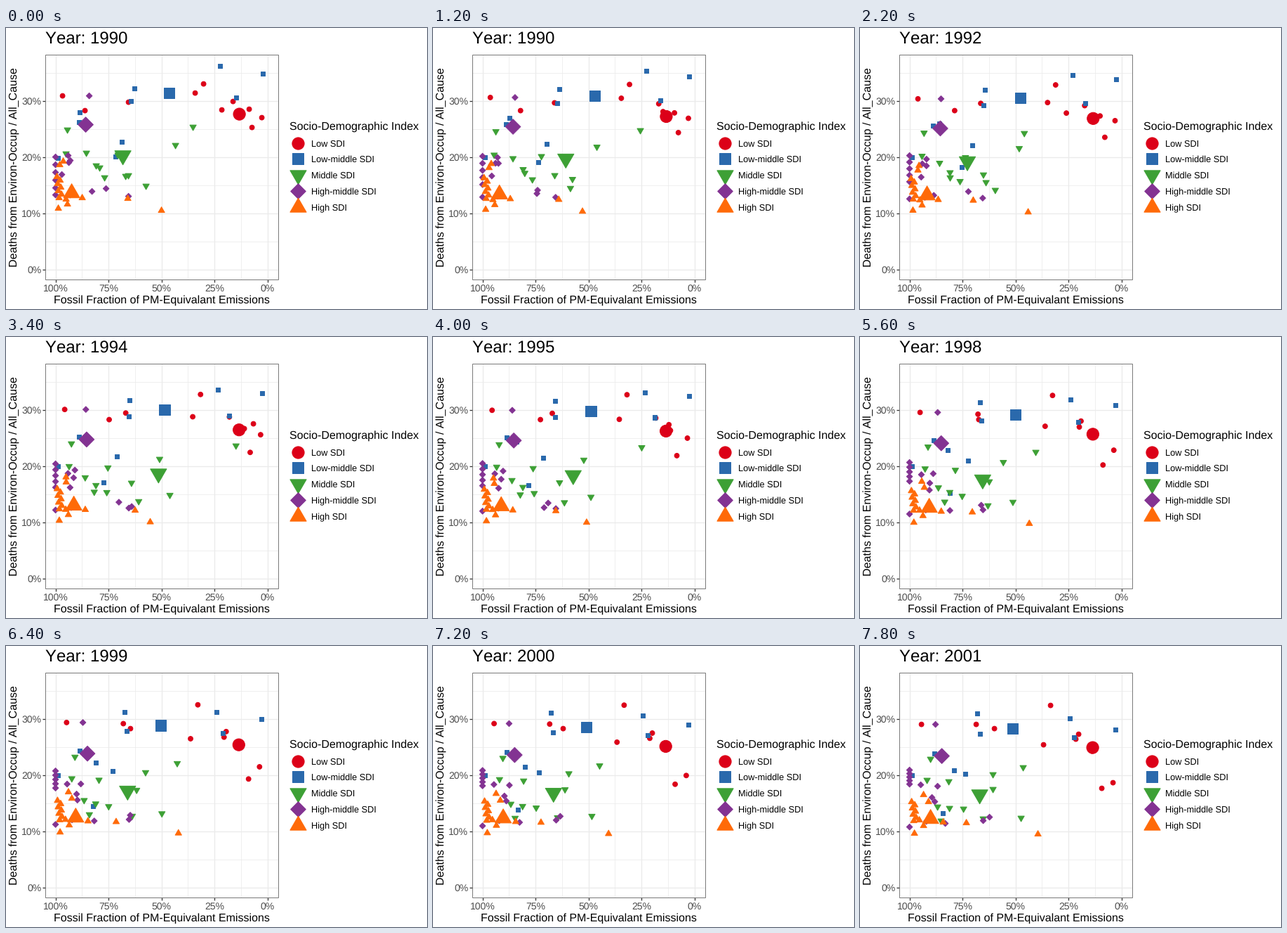
These frames come from a looping animation (600x400 px, 8 s). A matplotlib script:

```python
import numpy as np
import matplotlib.pyplot as plt
from matplotlib.animation import FuncAnimation
from matplotlib.patches import Rectangle
from matplotlib.path import Path

W, H, DPI = 600, 400, 100
FRAMES, STEP_MS = 40, 200
PT = 72 / DPI                      # points per pixel
SMALL, LARGE, EDGE = 3.4, 8.6, 1.0
LEFT, RIGHT, TOP, BOTTOM = 55.5, 387.5, 37.5, 357.5

plt.rcParams.update({
    "font.family": "Liberation Sans",
    "text.hinting": "none",
    "text.kerning_factor": 6,
})


def mark(x0, y0, x1, y1, surge=0, bend=0):
    """Start and end of a drift, a sideways surge and a vertical bow."""
    return x0, y0, x1, y1, surge, bend


# The last mark of each group is its large average
LOW = [
    mark(81, 97, 88, 112), mark(113, 118, 192, 118), mark(175, 106, 166, 112),
    mark(270, 93, 262, 141), mark(282, 80, 272, 85), mark(324, 105, 312, 126),
    mark(308, 117, 308, 133, surge=45), mark(347, 116, 331, 150),
    mark(365, 128, 361, 195, bend=-18), mark(351, 142, 345, 203, bend=-4),
    mark(333, 123, 332, 145),
]
LOW_MIDDLE = [
    mark(305, 54, 299, 103), mark(366, 65, 364, 119, bend=-8),
    mark(328, 99, 305, 130), mark(183, 86, 167, 96), mark(178, 104, 171, 125),
    mark(105, 120, 134, 177), mark(104, 134, 106, 153),
    mark(165, 162, 150, 182), mark(156, 183, 118, 238),
    mark(74, 185, 74, 184), mark(233, 93, 218, 118),
]
MIDDLE = [
    mark(267, 142, 233, 174, surge=76), mark(242, 168, 190, 184),
    mark(88, 146, 101, 162), mark(86, 180, 96, 192), mark(115, 179, 111, 230),
    mark(129, 197, 128, 232), mark(134, 200, 116, 250),
    mark(141, 214, 148, 233), mark(171, 212, 190, 205),
    mark(175, 211, 230, 246, surge=35), mark(200, 226, 176, 247),
    mark(160, 182, 127, 194), mark(167, 184, 171, 214, surge=49),
]
# Column of marks on the 100% line
HIGH_MIDDLE = [mark(71, 184 + 11 * k, 71, 177 + 5 * k) for k in range(5)] + [
    mark(71, 238, 71, 258), mark(119, 97, 108, 112), mark(89, 182, 111, 200),
    mark(92, 189, 103, 216), mark(90, 192, 87, 198), mark(80, 209, 107, 222),
    mark(143, 229, 185, 244), mark(123, 233, 122, 253, surge=57),
    mark(175, 240, 176, 249), mark(92, 238, 95, 250), mark(114, 138, 117, 157),
]
# Zigzag stack near the left edge
STACK_X = [73 + 4 * (k % 2) + k / 2 for k in range(7)]
HIGH = [mark(x, 211 + 5 * k, x + 1, 221 + 4.5 * k)
        for k, x in enumerate(STACK_X)] + [
    mark(222, 259, 254, 267, surge=-30), mark(174, 242, 152, 251, surge=20),
    mark(109, 241, 119, 250), mark(88, 250, 91, 255), mark(75, 256, 78, 266),
    mark(82, 189, 91, 211), mark(77, 194, 98, 221), mark(86, 243, 85, 247),
    mark(94, 232, 101, 243),
]


def triangle(sign):
    pts = [(0, 1.551 * sign), (-1.347, -0.776 * sign), (1.347, -0.776 * sign)]
    return Path(pts + pts[:1], closed=True)


# label, colour, marker, marker size per unit radius, vertical nudge, marks, legend y
GROUPS = [
    ("Low SDI", "#DC0018", "o", 2.0, 0, LOW, 163.7),
    ("Low-middle SDI", "#2A69AC", "s", 1.772, 0, LOW_MIDDLE, 186.3),
    ("Middle SDI", "#3DA035", triangle(-1), 3.102, -0.25, MIDDLE, 209.2),
    ("High-middle SDI", "#833392", "D", 1.772, 0, HIGH_MIDDLE, 232),
    ("High SDI", "#FF6A08", triangle(1), 3.102, 0.4, HIGH, 254.8),
]


def surge(t):
    return np.interp(t, [0, 6, 11, 17, 24, 39], [0, 0.45, -0.3, 1, 0.15, 0])


def places(marks, radii, nudge, t):
    x0, y0, x1, y1, push, bend = np.array(marks, float).T
    u = t / (FRAMES - 1)
    x = x0 + (x1 - x0) * u + push * surge(t)
    y = y0 + (y1 - y0) * u + bend * 4 * u * (1 - u)
    return np.column_stack([x - 0.4, y - 0.4 + nudge * radii])


def year(t):
    return 1990 + max(0, (t - 4) // 3)


fig = plt.figure(figsize=(W / DPI, H / DPI), dpi=DPI, facecolor="white")
ax = fig.add_axes([0, 0, 1, 1])
ax.set_xlim(0, W)
ax.set_ylim(H, 0)
ax.axis("off")


def line(x, y, color, width):
    ax.plot(x, y, color=color, lw=width * PT, zorder=0, solid_capstyle="butt")


def text(x, y, s, px, color="black", **kw):
    return ax.text(x, y, s, fontsize=px * PT, color=color, **kw)


def grid_x(percent):
    return 372.5 - 3.018 * percent


def grid_y(percent):
    return 343.7 - 8 * percent


# Panel grid, minor lines first
for p in (12.5, 37.5, 62.5, 87.5):
    line([grid_x(p)] * 2, [TOP, BOTTOM], "#EBEBEB", 0.8)
for p in (5, 15, 25, 35):
    line([LEFT, RIGHT], [grid_y(p)] * 2, "#EBEBEB", 0.8)
for p in (0, 25, 50, 75, 100):
    x = grid_x(p)
    line([x, x], [TOP, BOTTOM], "#EBEBEB", 1.4)
    line([x, x], [BOTTOM, BOTTOM + 4], "#333333", 1.3)
    text(x + 0.3, 375, f"{p}%", 14, "#4D4D4D", ha="center")
for p in (0, 10, 20, 30):
    y = grid_y(p)
    line([LEFT, RIGHT], [y, y], "#EBEBEB", 1.4)
    line([LEFT - 4, LEFT], [y, y], "#333333", 1.3)
    text(50.3, y + 5, f"{p}%", 14, "#4D4D4D", ha="right")
ax.add_patch(Rectangle((LEFT, TOP), RIGHT - LEFT, BOTTOM - TOP, fill=False,
                       ec="#7A7A7A", lw=PT, zorder=20))

title = text(55.5, 23, "", 24)
text(222, 392, "Fossil Fraction of PM-Equivalant Emissions", 16, ha="center")
text(12, 198.5, "Deaths from Environ-Occup / All_Cause", 16, rotation=90,
     ha="center", va="center")
text(404.5, 144.3, "Socio-Demographic Index", 16)


def scatter(xy, radii, color, marker, unit, z):
    sizes = (unit * radii * PT) ** 2
    return ax.scatter(xy[:, 0], xy[:, 1], s=sizes, marker=marker, c=color,
                      edgecolors=color, linewidths=EDGE * PT, zorder=z)


clouds = []
for z, (label, color, marker, unit, nudge, marks, key_y) in enumerate(GROUPS, 5):
    radii = np.array([SMALL] * (len(marks) - 1) + [LARGE])
    look = color, marker, unit, z
    cloud = scatter(places(marks, radii, nudge, 0), radii, *look)
    clouds.append((cloud, marks, radii, nudge))
    scatter(np.array([[415.7, key_y]]), np.array([LARGE]), *look)
    text(435.3, key_y + 5, label, 12.8)


def draw(t):
    title.set_text(f"Year: {year(t)}")
    for cloud, marks, radii, nudge in clouds:
        cloud.set_offsets(places(marks, radii, nudge, t))
    return [title] + [c[0] for c in clouds]


anim = FuncAnimation(fig, draw, frames=FRAMES, interval=STEP_MS,
                     repeat=True, repeat_delay=0, blit=False)
plt.show()
```
